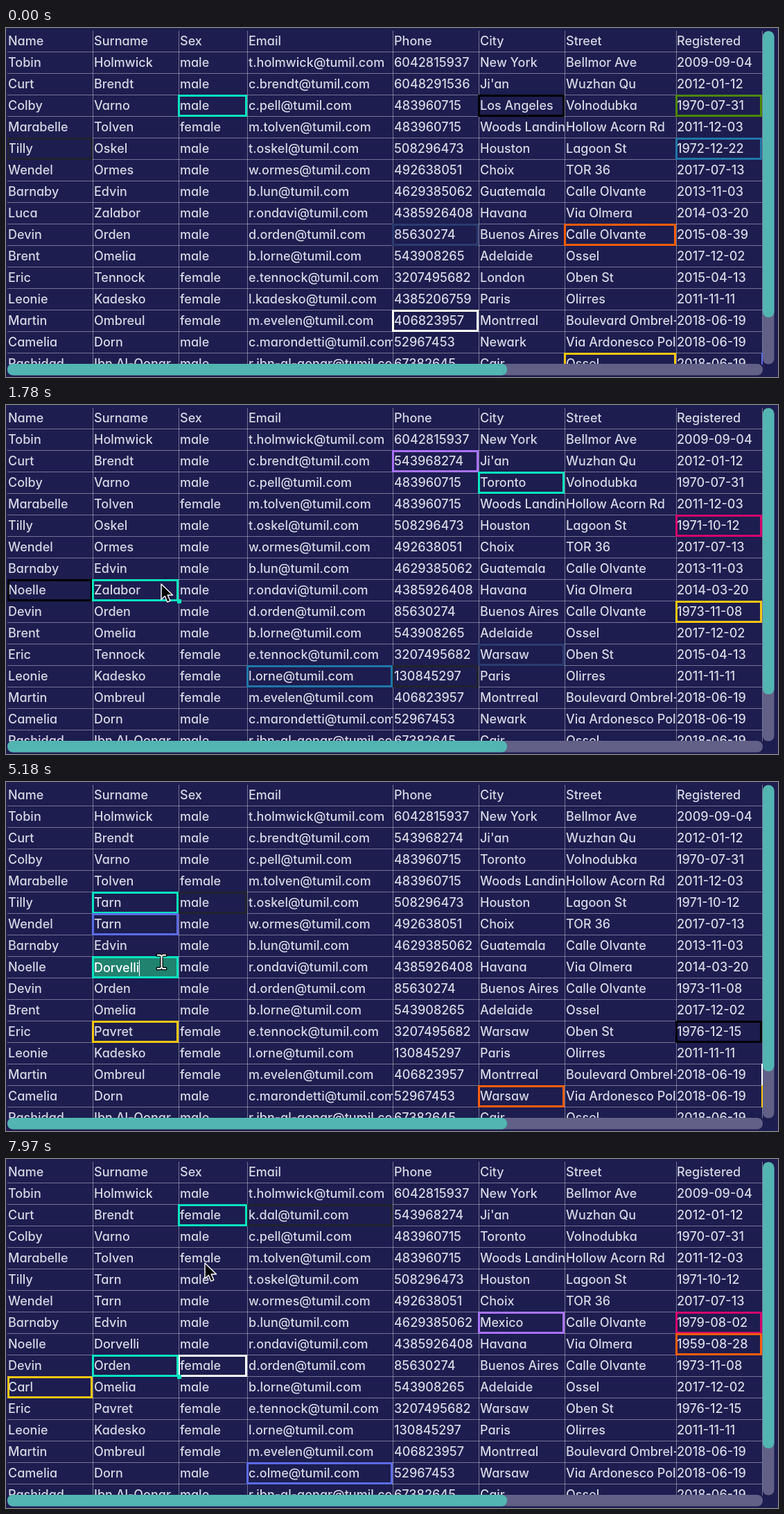
An HTML page that plays this animation: 1114 by 503 pixels, repeating every 8 s.

```html
<!DOCTYPE html>
<html lang="en">
<head>
<meta charset="utf-8">
<title>Shared table editing</title>
<style>
  html, body { margin: 0; width: 100%; height: 100%; overflow: hidden; background: #1d1d4f; }
  svg { display: block; width: 100vw; height: 100vh; }
  text { font: 450 18px Inter, "Open Sans", sans-serif; font-feature-settings: "cv11"; fill: #d6d6e4; white-space: pre; }
</style>
</head>
<body>
<svg id="stage" viewBox="0 0 1114 503"></svg>
<script>
const LOOP = 8000, ROW = 31, TOP = 34, BOTTOM = 485;
const colX = [3, 125, 249, 348, 558, 682, 806, 967, 1091, 1215];
const [NAME, SURNAME, SEX, EMAIL, PHONE, CITY, STREET, DATE, HIDDEN] = colX.keys();
const color = {
  teal: '#0be3bf', black: '#000', green: '#4c8706', dark: '#222230', blue: '#2176a8',
  indigo: '#2b3c70', orange: '#fb5d0b', white: '#fff', yellow: '#f6c613',
  purple: '#a873fb', pink: '#d4066d', violet: '#5b6ce4'
};

const mail = user => user + '@tumil.com';
const table = `Name|Surname|Sex|Email|Phone|City|Street|Registered
Tobin|Holmwick|male|t.holmwick|6042815937|New York|Bellmor Ave|2009-09-04
Curt|Brendt|male|c.brendt|6048291536|Ji'an|Wuzhan Qu|2012-01-12
Colby|Varno|male|c.pell|483960715|Los Angeles|Volnodubka|1970-07-31
Marabelle|Tolven|female|m.tolven|483960715|Woods Landing|Hollow Acorn Rd|2011-12-03
Tilly|Oskel|male|t.oskel|508296473|Houston|Lagoon St|1972-12-22
Wendel|Ormes|male|w.ormes|492638051|Choix|TOR 36|2017-07-13
Barnaby|Edvin|male|b.lun|4629385062|Guatemala|Calle Olvante|2013-11-03
Luca|Zalabor|male|r.ondavi|4385926408|Havana|Via Olmera|2014-03-20
Devin|Orden|male|d.orden|85630274|Buenos Aires|Calle Olvante|2015-08-39
Brent|Omelia|male|b.lorne|543908265|Adelaide|Ossel|2017-12-02
Eric|Tennock|female|e.tennock|3207495682|London|Oben St|2015-04-13
Leonie|Kadesko|female|l.kadesko|4385206759|Paris|Olirres|2011-11-11
Martin|Ombreul|female|m.evelen|406823957|Montrreal|Boulevard Ombrel-Nord|2018-06-19
Camelia|Dorn|male|c.marondetti|52967453|Newark|Via Ardonesco Polzi|2018-06-19
Rashidad|Ibn Al-Qonar|male|r.ibn-al-qonar|67382645|Cair|Ossel|2018-06-19`
  .split('\n').map((line, r) => line.split('|').map((v, c) => r && c === EMAIL ? mail(v) : v));

// Remote edits: when, then [row, column, value]
const edits = [
  [1780, [2, PHONE, '543968274'], [3, CITY, 'Toronto'], [5, DATE, '1971-10-12'], [8, NAME, 'Noelle'],
    [9, DATE, '1973-11-08'], [11, CITY, 'Warsaw'], [12, EMAIL, mail('l.orne')], [12, PHONE, '130845297']],
  [4720, [5, SURNAME, 'Tarn'], [6, SURNAME, 'Tarn'], [11, SURNAME, 'Pavret'], [11, DATE, '1976-12-15'], [14, CITY, 'Warsaw']],
  [5960, [8, SURNAME, 'Dorvelli']],
  [7680, [2, SEX, 'female'], [2, EMAIL, mail('k.dal')], [7, CITY, 'Mexico'], [7, DATE, '1979-08-02'],
    [8, DATE, '1959-08-28'], [9, SEX, 'female'], [10, NAME, 'Carl'], [14, EMAIL, mail('c.olme')]]
];

// Remote selections: when, then [row, column, colour]
const selections = [
  [0, [3, SEX, 'teal'], [3, CITY, 'black'], [3, DATE, 'green'], [5, NAME, 'dark'], [5, DATE, 'blue'],
    [9, PHONE, 'indigo'], [9, STREET, 'orange'], [13, PHONE, 'white'], [15, STREET, 'yellow'], [15, HIDDEN, 'violet']],
  [750, [12, PHONE, 'dark'], [2, PHONE, 'purple'], [3, CITY, 'teal'], [5, DATE, 'pink'], [8, NAME, 'black'],
    [9, DATE, 'yellow'], [11, CITY, 'indigo'], [12, EMAIL, 'blue']],
  [3710, [5, SEX, 'dark'], [5, SURNAME, 'teal'], [6, SURNAME, 'violet'], [11, SURNAME, 'yellow'], [11, DATE, 'black'],
    [14, CITY, 'orange'], [13, HIDDEN, 'white'], [14, HIDDEN, 'yellow']],
  [6670, [2, EMAIL, 'dark'], [2, SEX, 'teal'], [7, CITY, 'purple'], [7, DATE, 'pink'], [8, DATE, 'orange'],
    [9, SEX, 'white'], [10, NAME, 'yellow'], [14, EMAIL, 'violet']]
];

const typed = [[1860, 'Zalabor'], [2870, ''], [3480, 'D'], [3710, 'Do'], [3870, 'Dor'], [4430, 'Dorv'],
  [4480, 'Dorve'], [4800, 'Dorvel'], [4950, 'Dorvell'], [5180, 'Dorvelli']];

// Pointer keys: time, x, y
const arrive = [[440, 560, 496], [595, 546, 445], [750, 512, 376], [905, 405, 310], [1060, 290, 268],
  [1215, 231, 255], [1447, 224, 258]];
const leave = [[6900, 225, 255], [7132, 243, 232], [7365, 274, 192], [7597, 295, 164], [7830, 294, 153]];

const stage = document.getElementById('stage');
function add(parent, tag, attrs = {}, content = '') {
  const el = document.createElementNS('http://www.w3.org/2000/svg', tag);
  for (const key in attrs) el.setAttribute(key, attrs[key]);
  el.textContent = content;
  return parent.appendChild(el);
}
const set = (el, attrs) => { for (const key in attrs) el.setAttribute(key, attrs[key]); };
const show = (el, on) => el.setAttribute('visibility', on ? 'visible' : 'hidden');
const rowY = r => TOP + ROW * (r - 1);
const latest = (list, t) => list.filter(item => item[0] <= t).pop();

function clip(id, x, w) {
  add(add(stage, 'clipPath', { id }), 'rect', { x, y: 0, width: w, height: BOTTOM });
  return `url(#${id})`;
}
// Boxes start one pixel left of the column line
function frameOf(r, c) {
  return { x: colX[c] + .5, y: rowY(r) + 1.5, width: colX[c + 1] - colX[c] - 2, height: ROW - 2 };
}

// Grid and cells
const gridPath = table.map((_, r) => `M2 ${rowY(r + 1) + .5}H1091`).join('') +
  colX.slice(1, 9).map(x => `M${x + .5} 4V${BOTTOM}`).join('');
add(stage, 'path', { d: gridPath, stroke: '#fff', 'stroke-opacity': .38, 'clip-path': clip('area', 0, 1092) });
const cells = table.map(() => []);
const textX = c => colX[c] + (c === NAME ? 0 : c === DATE ? 1 : 2);
for (let c = 0; c < HIDDEN; c++) {
  const column = add(stage, 'g', { 'clip-path': clip('col' + c, colX[c], colX[c + 1] - colX[c]) });
  table.forEach((row, r) => {
    cells[r][c] = add(column, 'text', { x: textX(c), y: rowY(r) + 22 }, row[c]);
  });
}

// Remote boxes, then the local selection and editor above them
const overlay = add(stage, 'g', { 'clip-path': 'url(#area)' });
const groups = selections.map(([, ...boxes]) => {
  const group = add(overlay, 'g', { fill: 'none', 'stroke-width': 3 });
  for (const [r, c, name] of boxes) add(group, 'rect', { ...frameOf(r, c), stroke: color[name] });
  return group;
});
const own = add(overlay, 'rect', { stroke: color.teal, 'stroke-width': 3 });
const handle = add(overlay, 'rect', { width: 6, height: 6, fill: color.teal });
const editor = add(overlay, 'text', { x: 127, y: rowY(8) + 23, style: 'fill:#fff' });
const caret = add(overlay, 'rect', { y: 257, width: 1, height: 23, fill: '#fff' });

// Scrollbars
const bar = (x, y, width, height, fill) => add(stage, 'rect', { x, y, width, height, rx: 8, fill });
bar(1092, 4.5, 16.5, 480, '#626087');
bar(1092, 4.5, 16.5, 412.5, '#52b5b1');
bar(2, 484, 1090, 16.5, '#626087');
bar(2, 484, 721, 16.5, '#52b5b1');

// Pointers
const arrow = add(stage, 'path', {
  d: 'M0 0V22.5L5.3 17.6L8.8 26L12.8 24.3L9.3 16H16.5Z',
  fill: '#000', stroke: '#fff', 'stroke-width': 1.4, 'stroke-linejoin': 'round'
});
const beam = add(stage, 'g', { fill: 'none', 'stroke-linecap': 'square' });
for (const [stroke, width] of [['#000', 4.5], ['#fff', 2]])
  add(beam, 'path', { d: 'M219 249.5H222.5L224.5 251L226.5 249.5H230M224.5 251V267M219 269H222.5L224.5 267L226.5 269H230', stroke, 'stroke-width': width });

function along(keys, t) {
  const tick = keys[0][0] + Math.floor((t - keys[0][0]) / 77.5) * 77.5;
  const next = keys.findIndex(key => key[0] > tick);
  if (next < 0) return keys[keys.length - 1].slice(1);
  const [a, b] = [keys[next - 1], keys[next]];
  const k = (tick - a[0]) / (b[0] - a[0]);
  return [a[1] + (b[1] - a[1]) * k, a[2] + (b[2] - a[2]) * k];
}
function pointerAt(t) {
  if (t < 6900) return along(arrive, Math.max(t, 440));
  return t < 7970 ? along(leave, t) : [287, 150];
}

function render(t) {
  const values = table.map(row => row.slice());
  for (const [when, ...changes] of edits)
    if (t >= when) for (const [r, c, v] of changes) values[r][c] = v;
  values.forEach((row, r) => row.forEach((v, c) => {
    if (cells[r][c].textContent !== v) cells[r][c].textContent = v;
  }));

  const active = latest(selections, t);
  groups.forEach((group, i) => show(group, selections[i] === active));

  const editing = t >= 1860 && t < 5960;
  const ownRow = t < 5960 ? 8 : 9;
  set(own, { ...frameOf(ownRow, SURNAME), fill: editing ? '#20826f' : 'none' });
  set(handle, { x: 247, y: rowY(ownRow + 1) - 2 });
  show(own, t >= 1700);
  show(handle, t >= 1700 && !editing);
  show(cells[8][SURNAME], !editing);
  show(editor, editing);
  if (editing) {
    const word = latest(typed, t)[1];
    if (editor.textContent !== word) editor.textContent = word;
    set(caret, { x: Math.round(127 + (word ? editor.getComputedTextLength() : 0)) });
  }
  show(caret, t >= 2010 && t < 2470 || t >= 3020 && t < 5730);

  show(arrow, t >= 440 && !editing);
  show(beam, editing);
  set(arrow, { transform: `translate(${pointerAt(t).map(Math.round)})` });
}

const start = performance.now();
function loop(now) {
  render(Math.max(0, now - start) % LOOP);
  requestAnimationFrame(loop);
}
render(0);
requestAnimationFrame(loop);
</script>
</body>
</html>
```
